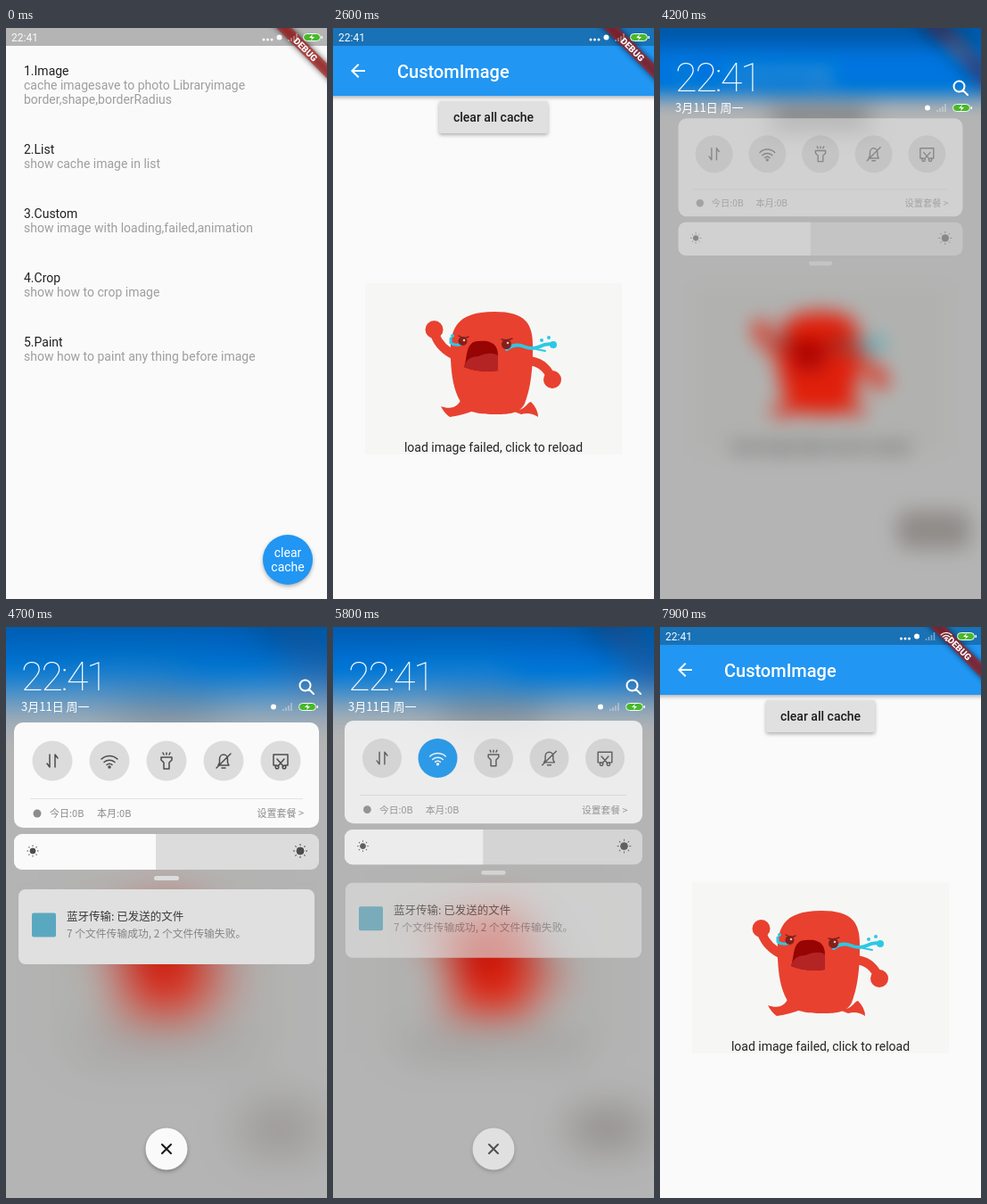
Recreate the animation shown at these times as an HTML page. Size 360 px wide and 640 px high, loop 8 s.

```html
<!DOCTYPE html>
<html lang="zh-CN">
<head>
<meta charset="utf-8">
<title>Image cache demo</title>
<style>
  html, body { margin: 0; width: 100%; height: 100%; overflow: hidden; background: #fafafa; }
  svg { display: block; width: 100%; height: 100%; }
  text { font: 14px Roboto, sans-serif; }
  .zh text { font-family: "Noto Sans CJK SC", "Noto Sans CJK", sans-serif; }
  .mid { text-anchor: middle; }
  .line { fill: none; stroke-linecap: round; stroke-linejoin: round; }
  .paper { fill: #fafafa; }
  .shade { fill: #dcdcdc; }
  .lift { filter: drop-shadow(0 2px 2px rgba(0, 0, 0, .3)); }
</style>
</head>
<body>
<svg viewBox="0 0 360 640">
  <defs>
    <g id="battery">
      <rect x=".5" y=".5" width="19" height="8" rx="4" fill="#48b82c" stroke="#f8fcf4"/>
      <rect x="20.5" y="3" width="1.5" height="3" fill="#f8fcf4"/>
      <path d="M11 1L7 5h3L9 8l4-4h-3z" fill="#fff"/>
    </g>
    <path id="signal" d="M1 9V7M4 9V5M7 9V3M10 9V0" stroke="#f4f4f4" stroke-width="1.5" opacity=".45"/>
    <g id="wifi">
      <path class="line" d="M-9-2A13 13 0 0 1 9-2M-6 1.5A9 9 0 0 1 6 1.5M-3 4.5A4.5 4.5 0 0 1 3 4.5"/>
      <circle cy="7" r="1"/>
    </g>
  </defs>

  <g id="home">
    <rect class="paper" width="360" height="640"/>
    <rect id="tap" y="188" width="360" height="60" fill="#808080"/>
    <g id="rows"></g>
    <circle class="lift" cx="316" cy="596" r="28" fill="#2196f3"/>
    <g class="mid" fill="#fff"><text x="316" y="593">clear</text><text x="316" y="609">cache</text></g>
    <rect width="360" height="20" fill="#b4b4b4"/>
  </g>

  <g id="app">
    <g id="page">
      <rect class="paper" x="-100" y="-100" width="560" height="840"/>
      <rect class="lift" x="-100" y="-100" width="560" height="176" fill="#2196f3"/>
      <rect x="-100" y="-100" width="560" height="120" fill="#1971b6"/>
      <path transform="translate(16 36)" d="M20 11H7.800l5.600-5.600L12 4l-8 8 8 8 1.400-1.400L7.800 13H20z" fill="#fff"/>
      <text x="72" y="56" fill="#fff" style="font-size:20px;font-weight:500">CustomImage</text>
      <rect class="lift" x="119" y="82" width="122" height="36" rx="2" fill="#e0e0e0"/>
      <text class="mid" x="180" y="105" fill="#1c1c1c" style="font-weight:500">clear all cache</text>

      <g id="failed">
        <rect x="36" y="286" width="288" height="192" fill="#f6f7f5"/>
        <g fill="#e8412f">
          <path class="line" d="M114 343Q120 360 139 368M219 373Q236 374 244 390" stroke="#e8412f" stroke-width="10"/>
          <circle cx="113.500" cy="338" r="10"/><circle cx="246" cy="394" r="10"/>
          <path d="M132 372C130 338 137 318 181 318C216 318 225 331 224 360C224 390 220 408 215 421C209 433 196 433 180 433C162 433 148 430 143 419C135 405 133 390 132 372Z"/>
          <path d="M146 410C142 426 132 428 121 424Q125 432 131 436Q146 434 160 428Z"/>
          <path d="M198 428L209 428C216 426 218 420 222 419Q230 427 230 436Q221 430 211 433Z"/>
        </g>
        <path d="M147 380C151 370 148 351 163 351C180 349 186 357 185 370V384Q164 387 147 380Z" fill="#960404"/>
        <path d="M147 380Q150 368 163 368Q177 362 185 367V384Q164 387 147 380Z" fill="#b42424"/>
        <g class="line" stroke="#2cc8e4" stroke-width="4">
          <path d="M195 360Q204 353 214 357T232 357T248 355"/>
          <path d="M145 354Q138 357 132 353V348" stroke-width="3"/>
          <path d="M228 360L238 362" stroke-width="2"/>
        </g>
        <g fill="#2cc8e4"><circle cx="234" cy="350" r="2"/><circle cx="242" cy="347" r="2"/><circle cx="247" cy="355" r="4"/><circle cx="134" cy="345" r="2"/></g>
        <g fill="#84201c"><circle cx="145.500" cy="351" r="5"/><circle cx="194.500" cy="354.500" r="5.500"/></g>
        <g fill="#f4c0b8"><circle cx="147" cy="350" r="1.300"/><circle cx="196" cy="353" r="1.300"/></g>
        <path class="line" d="M141 345Q147 349 152 346M189 349Q195 351 201 348" stroke="#84201c" stroke-width="1.500"/>
        <text class="mid" x="180" y="475" fill="#242424">load image failed, click to reload</text>
      </g>

      <g id="loading">
        <rect x="36" y="286" width="288" height="192" fill="#6d2410"/>
        <rect x="64" y="360" width="216" height="30" rx="15" fill="#fde399"/>
        <circle cx="269" cy="375" r="17.500" fill="#fcc828" stroke="#fdf4d0" stroke-width="3"/>
        <g id="fan" fill="#fff"></g>
        <text x="143" y="417" fill="#fde399" style="font:15px 'DejaVu Sans',sans-serif;letter-spacing:.5px">loading...</text>
      </g>
      <rect id="chip" x="266" y="541" width="82" height="43" rx="14" fill="#c6c3c0"/>
    </g>

    <g transform="translate(360 0) rotate(45)">
      <rect x="-60" y="28" width="120" height="12" fill="rgba(183,28,28,.63)" style="filter:drop-shadow(0 0 3px #000)"/>
      <text class="mid" y="37.700" fill="#fff" style="font-size:10.2px;font-weight:900">DEBUG</text>
    </g>
  </g>

  <g id="status" fill="#fafafa">
    <text x="6" y="15" style="font-size:12px">22:41</text>
    <g id="icons">
      <circle cx="289" cy="13" r="1.500"/><circle cx="293.500" cy="13" r="1.500"/><circle cx="298" cy="13" r="1.500"/>
      <circle cx="306.500" cy="10.500" r="3"/>
      <use href="#signal" x="316" y="6"/>
    </g>
    <use id="online" href="#wifi" transform="translate(321 10) scale(.65)" stroke="#fafafa" stroke-width="2"/>
    <use href="#battery" x="333" y="6"/>
  </g>

  <g id="header" class="zh" fill="#fff">
    <text x="17" y="71" style="font:200 45px Roboto,sans-serif;letter-spacing:-2.2px">22:41</text>
    <text x="17" y="94" style="font-size:13px">3月11日 周一</text>
    <path class="line" d="M340 70L345 75M341.500 65.500a6 6 0 1 1-12 0a6 6 0 1 1 12 0" stroke="#fff" stroke-width="2"/>
    <circle cx="300" cy="89.500" r="3"/>
    <use href="#signal" x="310" y="85"/>
    <use href="#battery" x="328" y="85"/>
  </g>

  <g id="panel" class="zh">
    <rect class="paper" x="9" y="107" width="342" height="118" rx="10"/>
    <g id="toggles"></g>
    <path d="M27 192.500H333" stroke="#e2e2e2"/>
    <g fill="#8c8c8c">
      <circle cx="35" cy="209" r="4.500"/>
      <text x="49" y="213" style="font-size:11px">今日:0B</text>
      <text x="102" y="213" style="font-size:11px">本月:0B</text>
      <text x="334" y="213" text-anchor="end" style="font-size:11px">设置套餐 &gt;</text>
    </g>
    <rect class="shade" x="9" y="232" width="342" height="40" rx="9"/>
    <path class="paper" d="M168 232H18a9 9 0 0 0-9 9v22a9 9 0 0 0 9 9H168z"/>
    <g id="suns" fill="#4c4c4c" stroke="#4c4c4c"></g>
    <rect class="shade" x="166" y="279" width="28" height="5" rx="2.500"/>
  </g>

  <g id="notice" class="zh">
    <rect x="14" y="294" width="332" height="84" rx="8" fill="#e0e0e0"/>
    <rect x="29" y="320.500" width="27" height="27" rx="2" fill="#5aa8c0"/>
    <text x="68" y="329" fill="#3a3a3a" style="font-size:12.5px;font-weight:500">蓝牙传输: 已发送的文件</text>
    <text x="68" y="348" fill="#848484" style="font-size:11.8px">7 个文件传输成功, 2 个文件传输失败。</text>
  </g>
  <g id="close">
    <circle class="paper lift" cx="180" cy="585" r="23.500"/>
    <path class="line" d="M175 580l10 10m0-10l-10 10" stroke="#181818" stroke-width="2"/>
  </g>
</svg>
<script>
const $ = id => document.getElementById(id);
const clamp = x => Math.min(1, Math.max(0, x));
const span = (t, from, to) => clamp((t - from) / (to - from));
const fade = (id, a) => { $(id).style.opacity = a; $(id).style.display = a > 0 ? '' : 'none'; };
const move = (id, tf) => $(id).setAttribute('transform', tf);

const rows = [
  [53, '1.Image', 'cache imagesave to photo Libraryimage', 'border,shape,borderRadius'],
  [141, '2.List', 'show cache image in list'],
  [213, '3.Custom', 'show image with loading,failed,animation'],
  [285, '4.Crop', 'show how to crop image'],
  [357, '5.Paint', 'show how to paint any thing before image']
];
$('rows').innerHTML = rows.map(([y, ...lines]) => lines.map((s, i) =>
  `<text x="20" y="${y + 16 * i}" fill="${i ? '#9e9e9e' : '#202020'}">${s}</text>`).join('')).join('');

$('fan').innerHTML = [0, 90, 180, 270].map(a =>
  `<path transform="rotate(${a})" d="M0 0C-9-8-6-14 0-14S9-8 0 0"/>`).join('') +
  '<circle r="2" fill="#fcc828"/>';

const glyphs = [
  '<path d="M-3-7V7L-6 3M3 7V-7L6-3"/>',
  '<use href="#wifi"/>',
  '<path d="M-6-4H6V-1L3 2V9H-3V2L-6-1ZM-3-7l-1-2M0-7v-2M3-7l1-2"/>',
  '<path d="M-6 5H6L4.500 2V-2A4.500 5 0 0 0-4.500-2V2ZM-2 8H2M-8 8L8-8"/>',
  '<path d="M-5 5H-8V-7H8V5H5M-4-2L3 6M4-2L-3 6"/><circle cx="-4" cy="7" r="1.800"/><circle cx="4" cy="7" r="1.800"/>'
];
$('toggles').innerHTML = glyphs.map((g, i) =>
  `<g transform="translate(${52 + 64 * i} 150)"><circle class="shade" r="22.500"/>
   <g class="line" stroke="#4c4c4c" stroke-width="1.500">${g}</g></g>`).join('');
const [wifiDisc, wifiGlyph] = $('toggles').children[1].children;

const sun = (x, r) => `<g transform="translate(${x} 251)"><circle r="${r}"/>` +
  [...Array(8).keys()].map(k => `<path transform="rotate(${45 * k})" d="M0 ${-r - 2}v${-r / 2}"/>`).join('') + '</g>';
$('suns').innerHTML = sun(30, 3) + sun(330, 4);

// 0 = page only, 1 = notification shade fully open
const shadeAt = t => t < 5000 ? 1 - (1 - span(t, 4100, 4700)) ** 3 : 1 - span(t, 5700, 6200);

function draw(t) {
  // The new page fades in while it rises by a quarter of the screen.
  const enter = span(t, 700, 1050);
  fade('home', enter < 1 ? 1 : 0);
  fade('tap', t >= 500 ? .25 : 0);
  fade('page', enter ** 2);
  move('page', `translate(0 ${160 * (1 - enter) ** 2 * (1 + 2 * enter)})`);

  const busy = t < 1600 || t >= 2700 && t < 3300;
  fade('loading', busy ? 1 : 0);
  fade('failed', busy ? 0 : 1);
  move('fan', `translate(269 375) rotate(${(t - 1100) * .3})`);

  const p = shadeAt(t);
  const shown = clamp(p * 2.5);
  $('app').style.filter = p
    ? `blur(${27 * p}px) brightness(${1 - .28 * shown}) saturate(${1 + .6 * shown})` : 'none';
  fade('chip', shown);
  fade('header', shown);
  fade('panel', p);
  const k = .883 + .117 * p;
  move('panel', `translate(180 21) scale(${k}) translate(-180 -21)`);
  const late = span(p, .45, 1);
  fade('notice', late);
  move('notice', `translate(0 ${-20 * (1 - late)})`);
  fade('close', late);

  const wifiOn = t >= 5100;
  wifiDisc.style.fill = wifiOn ? '#0c94f4' : '';
  wifiGlyph.style.stroke = wifiOn ? '#fff' : '';

  fade('status', p ? 0 : t < 6200 ? 1 : .35 + .65 * span(t, 6200, 6600));
  fade('online', t >= 7900 ? 1 : 0);
  move('icons', `translate(${t >= 7900 ? -18.5 : 0} 0)`);
}

const start = performance.now();
function tick(now) {
  draw(Math.floor(Math.max(0, now - start) % 8000 / 100) * 100);
  requestAnimationFrame(tick);
}
draw(0);
requestAnimationFrame(tick);
</script>
</body>
</html>
```
